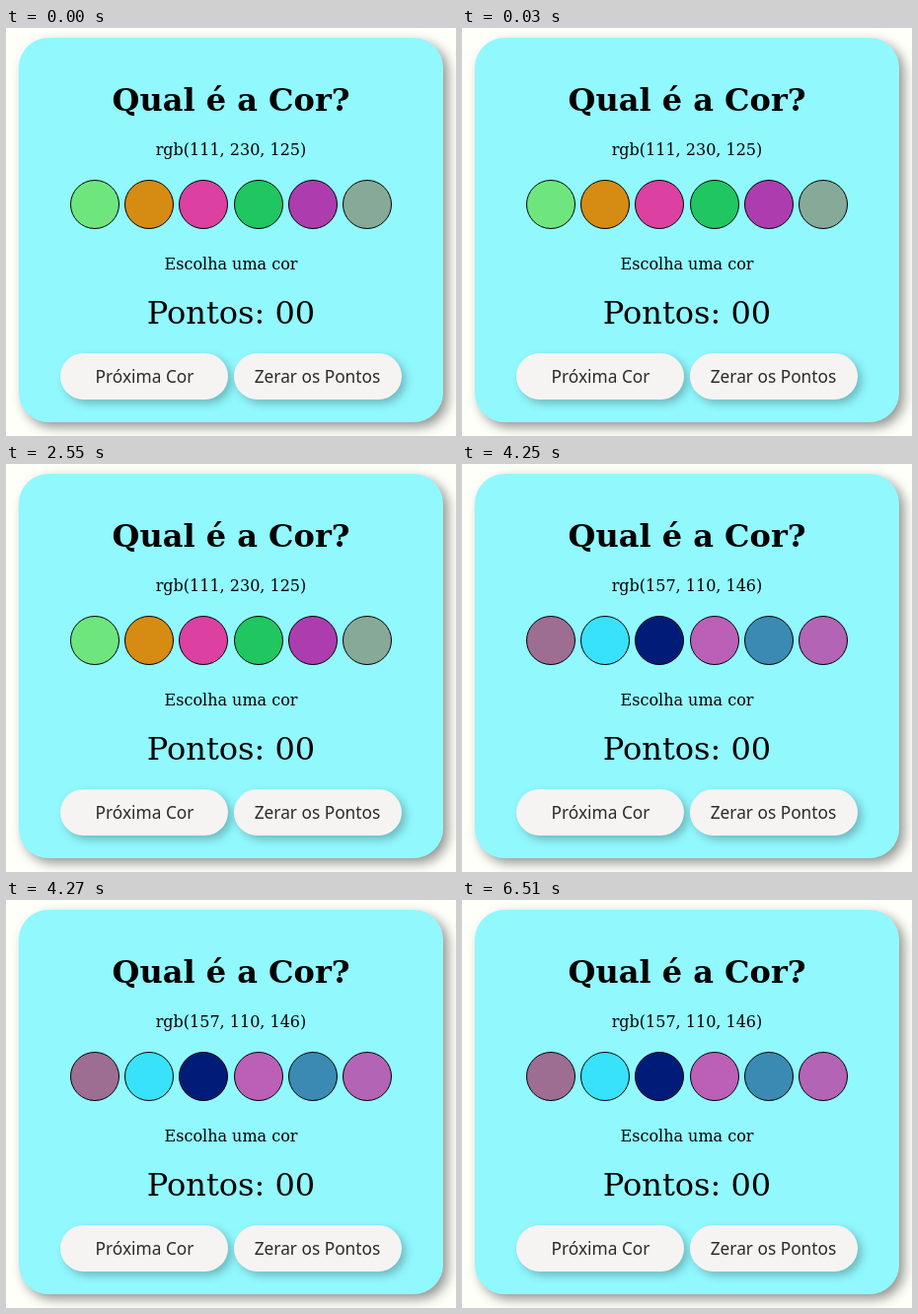
An HTML page that plays this animation: 456x414 px, repeating every 8 s.

```html
<!DOCTYPE html>
<html lang="pt">
<head>
<meta charset="utf-8">
<title>Qual é a Cor?</title>
<style>
  html, body { margin: 0; width: 100%; height: 100%; overflow: hidden; background: #fffffa; }
  svg { display: block; width: 456px; height: 414px; }
  text { font-family: "DejaVu Serif", "Noto Serif", serif; font-size: 16px; text-anchor: middle; }
  .title { font-size: 32px; font-weight: bold; }
  .score { font-size: 32px; }
  .label { font-family: Ubuntu, "Noto Sans", sans-serif; font-size: 17.3px; fill: #2b2b2b; }
  .card { fill: #91f8fe; filter: drop-shadow(5px 5px 6px rgba(0, 0, 0, .42)); }
  .button { fill: #f5f4f2; filter: drop-shadow(4px 4px 4px rgba(0, 0, 0, .25)); }
  circle { stroke: #000; }
</style>
</head>
<body>
<svg viewBox="0 0 456 414">
  <rect class="card" x="13" y="10" width="430" height="390" rx="30"/>
  <text class="title" x="228" y="84">Qual é a Cor?</text>
  <text id="question" x="228" y="129"></text>
  <g id="choices"></g>
  <text x="228" y="245">Escolha uma cor</text>
  <text class="score" x="228" y="300">Pontos: 00</text>
  <rect class="button" x="55" y="330" width="170" height="47" rx="23.5"/>
  <rect class="button" x="231" y="330" width="170" height="47" rx="23.5"/>
  <text class="label" x="140.5" y="360">Próxima Cor</text>
  <text class="label" x="315.5" y="360">Zerar os Pontos</text>
</svg>
<script>
  const LOOP = 8000;
  const rounds = [
    { at: 0, question: "rgb(111, 230, 125)",
      colors: ["#6fe67d", "#d68b12", "#dc40a0", "#20c65f", "#ad3daf", "#87aa98"] },
    { at: 4230, question: "rgb(157, 110, 146)",
      colors: ["#9d6e92", "#38e2fa", "#001c78", "#bb60b6", "#3b8ab4", "#b364b4"] }
  ];
  const question = document.getElementById("question");
  const choices = document.getElementById("choices");
  const circles = rounds[0].colors.map((_, i) => {
    const circle = document.createElementNS("http://www.w3.org/2000/svg", "circle");
    circle.setAttribute("cx", Math.round(90 + i * 55.2));
    circle.setAttribute("cy", 179);
    circle.setAttribute("r", 24.5);
    return choices.appendChild(circle);
  });

  let shown;
  function show(round) {
    if (round === shown) return;
    shown = round;
    question.textContent = round.question;
    circles.forEach((circle, i) => circle.setAttribute("fill", round.colors[i]));
  }

  const start = performance.now();
  function tick() {
    const time = (performance.now() - start) % LOOP;
    show(rounds.findLast(round => round.at <= time));
    requestAnimationFrame(tick);
  }
  show(rounds[0]);
  requestAnimationFrame(tick);
</script>
</body>
</html>
```
